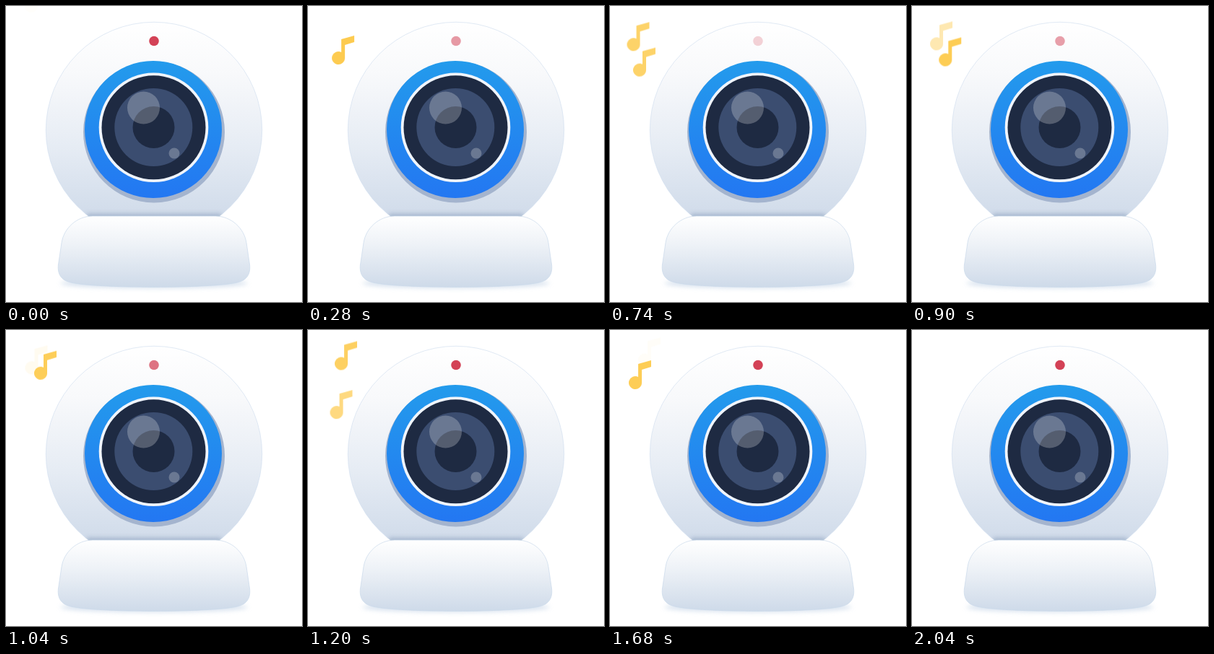
Write an HTML page that moves like this. It is 410 by 410 pixels and loops after 2400 ms.

```html
<!DOCTYPE html>
<html lang="en">
<head>
<meta charset="utf-8">
<title>Webcam with music notes</title>
<style>
  html, body { margin: 0; width: 100%; height: 100%; overflow: hidden; background: #fff; }
  svg { display: block; width: 100%; height: 100%; }

  .led { animation: blink 2400ms linear infinite; }
  @keyframes blink { 0%, 50%, 100% { opacity: 1; } 25% { opacity: 0; } }

  /* translate carries the rise, transform the sideways sway */
  .note { fill: #fdc53a; opacity: 0; animation: 2400ms infinite; }
  .n1 { animation-name: rise1, sway1, fade1; }
  .n2 { animation-name: rise2, sway2, fade2; }
  .n3 { animation-name: rise3, sway3, fade3; }
  .note { animation-timing-function: linear, ease-in-out, linear; }

  @keyframes rise1 {
    0%, .83% { translate: 0 102px; animation-timing-function: cubic-bezier(.33, 1, .68, 1); }
    41.67%, 100% { translate: 0 52.3px; }
  }
  @keyframes sway1 {
    0%, .83% { transform: translateX(35px); }
    17.5% { transform: translateX(44.5px); }
    30.83% { transform: translateX(32.5px); }
    44%, 100% { transform: translateX(35.5px); }
  }
  @keyframes fade1 {
    0%, .5% { opacity: 0; }
    8% { opacity: .9; }
    19.17% { opacity: .87; }
    30.83% { opacity: .76; }
    43.33% { opacity: .08; }
    45%, 100% { opacity: 0; }
  }

  @keyframes rise2 {
    0%, 23.33% { translate: 0 95px; animation-timing-function: cubic-bezier(.37, 0, .63, 1); }
    56.67%, 100% { translate: 0 41.5px; }
  }
  @keyframes sway2 {
    0%, 23.33% { transform: translateX(38px); }
    43.33% { transform: translateX(48px); }
    50% { transform: translateX(46px); }
    56.67%, 100% { transform: translateX(48px); }
  }
  @keyframes fade2 {
    0%, 23.8% { opacity: 0; }
    32% { opacity: .88; }
    43.33% { opacity: .84; }
    56.67% { opacity: .76; }
    70% { opacity: .04; }
    71%, 100% { opacity: 0; }
  }

  @keyframes rise3 {
    0%, 45% { translate: 0 136px; animation-timing-function: cubic-bezier(.33, .67, .67, 1); }
    71.67%, 100% { translate: 0 72.7px; }
  }
  @keyframes sway3 {
    0%, 45% { transform: translateX(42px); }
    56.67% { transform: translateX(35.5px); }
    63% { transform: translateX(37.5px); }
    70% { transform: translateX(35px); }
    85%, 100% { transform: translateX(36.5px); }
  }
  @keyframes fade3 {
    0%, 45.5% { opacity: 0; }
    51% { opacity: .78; }
    56.67% { opacity: .82; }
    70% { opacity: .86; }
    84.5%, 100% { opacity: 0; }
  }
</style>
</head>
<body>
<svg viewBox="0 0 410 410">
  <defs>
    <linearGradient id="shell" x1="0" y1="22" x2="0" y2="310" gradientUnits="userSpaceOnUse">
      <stop offset="0" stop-color="#fff"/>
      <stop offset=".25" stop-color="#f8f9fb"/>
      <stop offset=".6" stop-color="#e6ecf4"/>
      <stop offset="1" stop-color="#ccd8e8"/>
    </linearGradient>
    <linearGradient id="foot" x1="0" y1="0" x2="0" y2="1">
      <stop offset="0" stop-color="#fff"/>
      <stop offset=".4" stop-color="#eef2f7"/>
      <stop offset="1" stop-color="#cedae9"/>
    </linearGradient>
    <linearGradient id="ring" x1="0" y1="0" x2="0" y2="1">
      <stop offset="0" stop-color="#239bec"/>
      <stop offset="1" stop-color="#2377f2"/>
    </linearGradient>
    <filter id="soft" x="-10%" y="-100%" width="120%" height="300%">
      <feGaussianBlur stdDeviation="3"/>
    </filter>
    <clipPath id="head"><circle cx="205" cy="172" r="150"/></clipPath>
    <path id="note" d="M4 -26 L22 -31 V-22 L9 -18 V0 A9 9 0 1 1 4 -8 Z"/>
  </defs>

  <circle cx="205" cy="172" r="149.7" fill="url(#shell)" stroke="#d3e0f0" stroke-width=".7"/>
  <g clip-path="url(#head)">
    <rect x="112" y="288" width="186" height="10" fill="#8fa3bf" opacity=".7" filter="url(#soft)"/>
  </g>

  <ellipse cx="205" cy="384" rx="130" ry="7" fill="#c3d3e6" opacity=".65" filter="url(#soft)"/>
  <path d="M120 291 H290 C312 291 330 308 333 328 L337.5 358 C339 371 334 380 320 383
           C284 391.500 126 391.500 90 383 C76 380 71 371 72.500 358 L77 328 C80 308 98 291 120 291 Z"
        fill="url(#foot)" stroke="#c9d8ea" stroke-width=".7"/>

  <circle cx="205" cy="174.500" r="98" fill="#a4b4ce"/>
  <circle cx="204" cy="171" r="95" fill="url(#ring)"/>
  <circle cx="204.500" cy="168.300" r="75.800" fill="#f0f5fc"/>
  <circle cx="204.500" cy="168.300" r="72" fill="#1e2a42"/>
  <circle cx="204.300" cy="168" r="54" fill="#3b4d70"/>
  <circle cx="204.500" cy="168" r="29" fill="#1e2a42"/>
  <g fill="#fff" opacity=".24">
    <circle cx="190.500" cy="141" r="22.500"/>
    <circle cx="233" cy="204" r="7.500"/>
  </g>
  <circle class="led" cx="205" cy="48.500" r="6.800" fill="#d34256"/>

  <use href="#note" class="note n1"/>
  <use href="#note" class="note n2"/>
  <use href="#note" class="note n3"/>
</svg>
</body>
</html>
```
